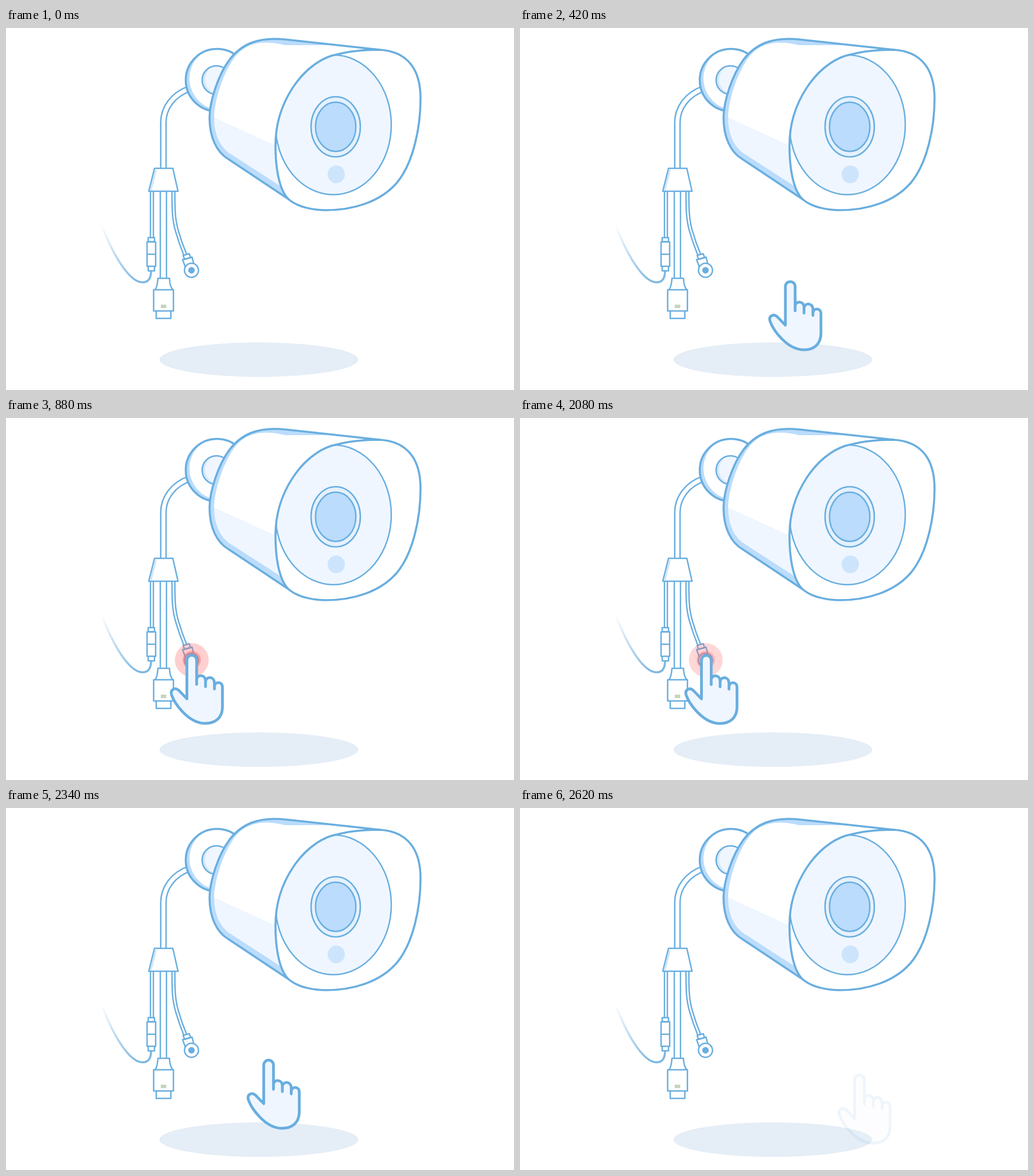
These frames come from a looping animation (886 px wide and 632 px high, 3000 ms). An HTML page:

```html
<!DOCTYPE html>
<html lang="en">
<head>
<meta charset="utf-8">
<title>Camera reset</title>
<style>
  html, body { margin: 0; width: 100%; height: 100%; overflow: hidden; background: #fff; }
  svg { display: block; width: 100%; height: 100%; }
  .line { fill: #fff; stroke: #69aedf; stroke-width: 2.5; }
  .bold { stroke: #69aedf; stroke-width: 3.6; stroke-linejoin: round; stroke-linecap: round; }
  .none { fill: none; }
  .pale { fill: #eff6ff; }
  .mid { fill: #bbdcfc; }
  .white { fill: #fff; }
</style>
</head>
<body>
<svg viewBox="0 0 886 632">
  <defs>
    <linearGradient id="fade" gradientUnits="userSpaceOnUse" x1="170" y1="342" x2="232" y2="440">
      <stop offset="0" stop-color="#7db8e2" stop-opacity="0"/>
      <stop offset="1" stop-color="#7db8e2"/>
    </linearGradient>
    <path id="face" d="M652 38C610 38 590 43 569 48C517 64 470 130 470 205C470 250 478 285 493 299C510 314 540 318 558 318C605 318 652 304 681 271C711 236 723 172 723 123C723 73 701 41 652 38Z"/>
    <path id="shell" d="M652 38L487 20C440 15 411 28 390 55C370 82 355 128 355 157C355 190 367 217 388 229L493 299"/>
    <clipPath id="faceClip"><use href="#face"/></clipPath>
    <clipPath id="shellClip"><use href="#shell"/></clipPath>
    <clipPath id="mountClip"><circle cx="368" cy="91" r="54.5"/></clipPath>
    <clipPath id="hubClip"><circle cx="367" cy="91" r="25"/></clipPath>
  </defs>

  <ellipse cx="441" cy="579" rx="173.5" ry="30" fill="#e5edf6"/>

  <g id="cables" fill="none"></g>

  <!-- wall mount -->
  <g clip-path="url(#mountClip)">
    <circle class="mid" cx="368" cy="91" r="55"/>
    <circle class="white" cx="375" cy="88" r="55"/>
  </g>
  <circle class="bold none" cx="368" cy="91" r="54.5"/>
  <g clip-path="url(#hubClip)">
    <circle cx="367" cy="91" r="25" fill="#d3e7fc"/>
    <circle class="pale" cx="372" cy="90" r="25"/>
  </g>
  <circle class="line none" cx="367" cy="91" r="25"/>

  <!-- housing -->
  <use href="#shell" class="mid"/>
  <g clip-path="url(#shellClip)">
    <path class="white" d="M660 30H487C430 16 407 37 393 60C376 87 363 130 363 157L470 206L570 230L660 60Z"/>
    <path class="pale" d="M363 157L470 206L520 230V308L480 277L395 222C375 211 363 188 363 157Z"/>
  </g>
  <use href="#shell" class="bold none"/>
  <use href="#face" class="white"/>
  <g clip-path="url(#faceClip)">
    <ellipse class="line pale" style="fill:#eff6ff" cx="571" cy="169" rx="101" ry="122"/>
  </g>
  <use href="#face" class="bold none"/>
  <ellipse class="line" style="fill:#e5f1fd" cx="575" cy="172.5" rx="43" ry="52.5"/>
  <ellipse class="line" style="fill:#bbdcfc" cx="575" cy="172.5" rx="35.2" ry="43"/>
  <ellipse cx="576" cy="255.5" rx="15" ry="15.5" fill="#cde5fc"/>

  <!-- plugs -->
  <path d="M253 424C253 437 248 444 238 444C219 444 192 410 166 342" fill="none" stroke="url(#fade)" stroke-width="3.6"/>
  <g class="line" stroke-linejoin="round">
    <path d="M259 245H291L300 285H249Z"/>
    <path d="M261.5 248L252.5 283" stroke="#cfe5fb" stroke-width="3"/>
    <path d="M248 366H259V373H248ZM248 416H259V424H248ZM246 373.500H261V416H246ZM246 395H261"/>
    <path d="M265 437H285Q286 452 291 457H260Q264 452 265 437ZM257.500 457H292V494H257.500ZM262 494H287.500V507H262Z"/>
    <path d="M309 397L319.500 394L322 401L311.500 404ZM308 404.500L324.500 400L328 414L313 418Z"/>
    <circle cx="323.500" cy="423" r="12.200"/>
  </g>
  <circle cx="323.500" cy="423" r="5.700" fill="#69aedf"/>
  <rect x="270" y="483" width="9.500" height="6" fill="#c5d6bb"/>

  <g id="pulse" fill="#ff6464" opacity="0">
    <circle cx="324" cy="422.500" r="29.500" fill-opacity=".31"/>
    <circle cx="324" cy="422.500" r="16" fill-opacity=".4"/>
  </g>

  <g id="hand" opacity="0">
    <path transform="translate(-147.500 -28.800)" fill="#eff6ff" stroke="#69aedf" stroke-width="4.800" stroke-linecap="round" stroke-linejoin="round"
      d="M463 519V451.500A8.500 8.500 0 0 1 480 451.500V494V486C480 476 495.500 476 495.500 488V498V490C495.500 479 511 479 511 492V502V499C511 488 525 488 525 499V533C525 552 513 562 495 562C466 562 442 528 436.500 513C433 503 442 498 449 504.500Z"/>
  </g>
</svg>
<script>
  const LOOP = 3000, STEP = 20;
  const TRAVEL = { x: 268, y: 52 };
  const hand = document.getElementById('hand');
  const pulse = document.getElementById('pulse');

  // Each tube: path, outer width, inner width.
  const tubes = [
    ['M320 106C291 116 274.5 140 274.5 165V246', 11.8, 6.8],
    ['M254.500 284V367', 7.5, 2.6],
    ['M274.500 284V438', 13.2, 8.4],
    ['M292 284C292 315 292 333 298 354Q304 375 313 397', 7.5, 2.6]
  ];
  document.getElementById('cables').innerHTML = tubes.map(([d, outer, inner]) =>
    `<path d="${d}" stroke="#69aedf" stroke-width="${outer}"/><path d="${d}" stroke="#fff" stroke-width="${inner}"/>`
  ).join('');

  const ramp = (t, from, to) => Math.min(1, Math.max(0, (t - from) / (to - from)));
  const smooth = u => u * u * (3 - 2 * u);

  function draw(t) {
    const away = 1 - smooth(ramp(t, 140, 740)) + smooth(ramp(t, 2060, 2620));
    const shown = t < 120 ? 0
      : t < 1500 ? ramp(t, 100, 280)
      : Math.max(0.1, 1 - ramp(t, 2460, 2640));
    hand.setAttribute('transform', `translate(${TRAVEL.x * away} ${TRAVEL.y * away})`);
    hand.setAttribute('opacity', shown);
    pulse.setAttribute('opacity', ramp(t, 780, 880) - ramp(t, 2060, 2180));
  }

  const start = performance.now();
  function tick() {
    const t = (performance.now() - start) % LOOP;
    draw(Math.floor(t / STEP) * STEP);
    requestAnimationFrame(tick);
  }
  tick();
</script>
</body>
</html>
```
